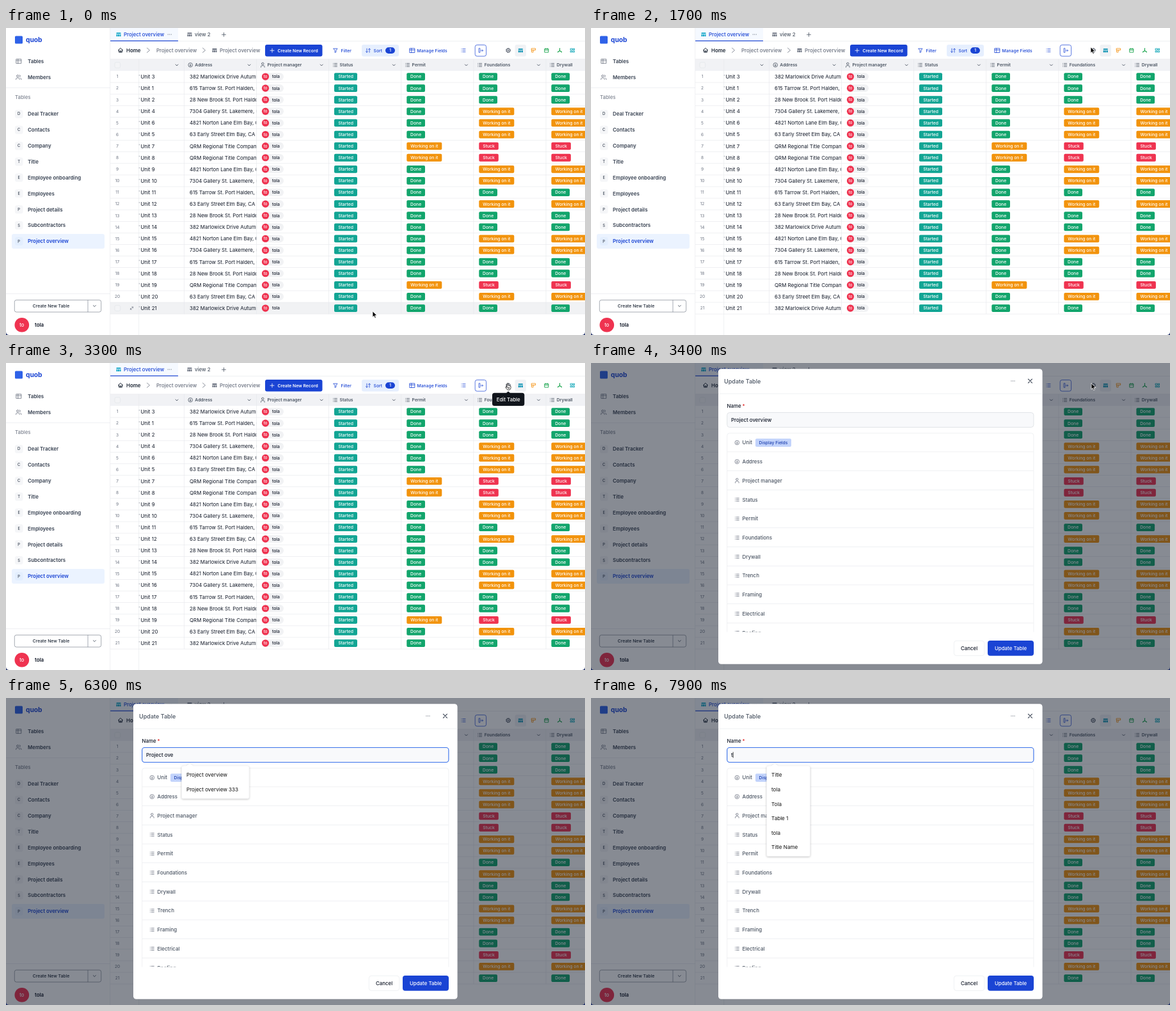
These frames come from a looping animation (905x480 px, 8000 ms). An HTML page:

```html
<!DOCTYPE html>
<html lang="en">
<head>
<meta charset="utf-8">
<title>Table editor</title>
<style>
html, body { margin: 0; width: 100%; height: 100%; overflow: hidden; background: #fff; }
svg { display: block; width: 905px; height: 480px; }
text { font-family: Inter, "Liberation Sans", sans-serif; white-space: pre; }
</style>
</head>
<body>
<svg id="stage" viewBox="0 0 905 480"></svg>
<script>
const LOOP = 8000, ROW = 18.1, TOP = 67;
const BLUE = '#1a44d4', INK = '#374151', LINE = '#e5e7eb', RED = '#ef3350';
const USER = 'tola', INITIALS = 'to', BRAND = 'quob';

// Text is centred vertically on y.
const text = (x, y, s, size = 7.92, fill = INK, weight = 500, anchor = 'start', attrs = '') =>
  `<text x="${x}" y="${y + size * .36}" font-size="${size}" fill="${fill}" font-weight="${weight}" text-anchor="${anchor}" ${attrs}>${s}</text>`;
const rect = (x, y, w, h, fill, r = 0, stroke = 'none', sw = .6, attrs = '') =>
  `<rect x="${x}" y="${y}" width="${w}" height="${h}" rx="${r}" fill="${fill}" stroke="${stroke}" stroke-width="${sw}" ${attrs}/>`;
const circle = (x, y, r, fill, stroke = 'none') =>
  `<circle cx="${x}" cy="${y}" r="${r}" fill="${fill}" stroke="${stroke}" stroke-width=".8"/>`;
const path = (x, y, d, stroke = INK, sw = .8, fill = 'none') =>
  `<path transform="translate(${x} ${y})" d="${d}" stroke="${stroke}" stroke-width="${sw}" fill="${fill}" stroke-linecap="round" stroke-linejoin="round"/>`;
const hline = (x, y, w, c = LINE) => rect(x, y - .3, w, .6, c);
const vline = (x, y, h, c = LINE) => rect(x - .3, y, .6, h, c);
const group = (id, body) => `<g id="${id}">${body}</g>`;

const ICON = {
  down: 'M-2 -1L0 1L2 -1',
  right: 'M-2 -3.5L2 0L-2 3.5',
  plus: 'M-3 0H3M0 -3V3',
  dots: 'M-2.5 0h.01M0 0h.01M2.5 0h.01',
  cross: 'M-3 -3L3 3M3 -3L-3 3',
  list: 'M-1.2 -2.4H3M-1.2 0H3M-1.2 2.4H3M-3 -2.4h.01M-3 0h.01M-3 2.4h.01',
  person: 'M-1.7 -2a1.7 1.7 0 1 0 3.4 0a1.7 1.7 0 1 0 -3.4 0M-2.8 3.6V2.6Q-2.8 1 -1 1H1Q2.8 1 2.8 2.6V3.6',
  table: 'M-3.8 -3.3H3.8V3.3H-3.8ZM-3.8 -1H3.8M-1.2 -3.3V3.3',
  people: 'M-3.3 -2a1.6 1.6 0 1 0 3.2 0a1.6 1.6 0 1 0 -3.2 0M-4.3 3.6V2.6Q-4.3 1 -2.6 1H-.6Q1 1 1 2.6V3.6M1.3 -3.5A1.6 1.6 0 0 1 1.3 -.5M2.6 1.2Q4 1.5 4 3.6',
  home: 'M-3.5 0L0 -3.5L3.5 0M-2.5 -.5V3H2.5V-.5M-.8 3V1H.8V3',
  funnel: 'M-3 -3H3L.9 0V2.5L-.9 3.2V0Z',
  sort: 'M-2 -3V3M-3.5 1.5L-2 3L-.5 1.5M2 3V-3M.5 -1.5L2 -3L3.5 -1.5',
  expand: 'M-2 2L2 -2M.2 -2H2V-.2M-2 .2V2H-.2'
};
const icon = (name, x, y, c = INK, sw = .8) => path(x, y, ICON[name], c, sw);
const fieldIcon = (kind, x, y, c = '#4b5563') => kind === 'text'
  ? circle(x, y, 3.3, 'none', c) + path(x, y, 'M0 -1.5V1.6M-1.1 .3L0 1.6L1.1 .3', c, .8)
  : icon(kind, x, y, c);
const solidGrid = (x, y, c) => rect(x - 3.5, y - 3, 7, 1.9, c, .5) +
  rect(x - 3.5, y - .5, 2, 3.5, c, .4) + rect(x - .9, y - .5, 2, 3.5, c, .4) + rect(x + 1.7, y - .5, 1.8, 3.5, c, .4);

function sidebar() {
  let s = rect(0, 0, 163, 480, '#fff') + vline(162.8, 0, 480);
  s += rect(14, 12.5, 12, 12, '#2f62e8', 1.5) + text(31, 18.3, BRAND, 10.2, BLUE, 700);
  s += icon('table', 20, 52, '#6b7280') + text(34, 52, 'Tables', 7.92, INK, 600);
  s += icon('people', 20, 77, '#6b7280') + text(34, 77, 'Members', 7.92, INK, 600);
  s += hline(0, 93.5, 163) + text(14, 108, 'Tables', 7.92, '#6b7280', 400);
  ['Deal Tracker', 'Contacts', 'Company', 'Title', 'Employee onboarding', 'Employees',
    'Project details', 'Subcontractors', 'Project overview'].forEach((name, i) => {
    const y = 134.4 + i * 24.88, on = i === 8;
    if (on) s += rect(9, y - 11.5, 145, 23, '#ebf3ff', 3);
    s += rect(14, y - 6.5, 12.5, 13, on ? '#e3eefe' : '#f5f6f8', 3);
    s += text(20.2, y, name[0], 5.8, INK, 500, 'middle') + text(34, y, name, 7.92, on ? BLUE : INK, 600);
  });
  s += hline(0, 415.5, 163) + rect(13.3, 425.3, 135.4, 18.8, '#fff', 3, '#6b7280') + vline(128, 425.3, 18.8, '#6b7280');
  s += text(70.5, 434.7, 'Create New Table', 6.79, '#1f2937', 500, 'middle') + icon('down', 138.3, 434.7);
  return s + circle(24.8, 464.3, 11.3, RED) + text(24.8, 464, INITIALS, 7.4, '#fff', 500, 'middle') +
    text(45, 464.3, USER, 7.92, '#111827', 600);
}

function toolbar() {
  let s = rect(163, 0, 106, 20, '#f5f9ff') + hline(163, 20.5, 742) + rect(163, 19.5, 106, 1.2, BLUE);
  s += solidGrid(176, 10.2, '#0ea5c6') + text(184, 10.2, 'Project overview', 7.92, BLUE) + icon('dots', 255.7, 10, INK, 1.1);
  s += solidGrid(287, 10.2, '#6b7280') + text(295, 10.2, 'view 2', 7.92, '#4b5563') + icon('plus', 340.5, 10.3, '#4b5563');
  s += icon('home', 179, 34.8, '#1f2937', 1) + text(188, 34.8, 'Home', 7.92, '#1f2937', 600);
  s += icon('right', 222.5, 34.8, '#6b7280') + text(235, 34.8, 'Project overview', 7.92, '#6b7280');
  s += icon('right', 309.5, 34.8, '#6b7280') + solidGrid(326, 35, '#6b7280') + text(334, 34.8, 'Project overview', 7.92, '#6b7280');
  s += rect(405, 26, 89.5, 18.5, BLUE, 3) + icon('plus', 416, 35.2, '#fff') + text(424.5, 35.2, 'Create New Record', 6.79, '#fff', 600);
  s += icon('funnel', 515, 35.2, BLUE) + text(523.5, 35.2, 'Filter', 6.79, BLUE);
  s += rect(556, 26, 58, 18.5, '#e6effe', 3) + icon('sort', 566, 35.2, BLUE) + text(574.5, 35.2, 'Sort', 6.79, BLUE);
  s += rect(593, 30.2, 15, 9.8, BLUE, 4.9) + text(600.5, 35.1, '1', 6.4, '#fff', 600, 'middle');
  s += icon('table', 635, 35.2, BLUE) + text(642.5, 35.2, 'Manage Fields', 6.79, BLUE);
  s += icon('list', 715, 35, BLUE, .7) + rect(733.2, 26.5, 17.4, 17.6, '#fff', 3, BLUE, .7);
  s += path(742, 35.2, 'M-3 -3V3H-1V-3ZM.3 0H3.5M2.2 -1.3L3.5 0L2.2 1.3', BLUE, .7);
  s += circle(785, 35, 2.8, 'none', '#374151') + circle(785, 35, 1, 'none', '#374151');
  s += `<circle cx="785" cy="35" r="3.4" fill="none" stroke="#374151" stroke-width="1" stroke-dasharray="1.33 1.33"/>`;
  s += rect(795.5, 26, 17.5, 18.5, '#f0f2f5', 3) + solidGrid(804.3, 35.2, '#0891b2');
  s += path(824.6, 35, 'M-3 -3H3V-.5H-3ZM-3 -.5V2.8H-.5V-.5', '#f59316', .9);
  s += path(845, 35, 'M-2.8 -2.4H2.8V3H-2.8ZM-2.8 -.6H2.8M-1.3 -3.3V-2.4M1.3 -3.3V-2.4', '#16a34a', .9);
  s += path(865.5, 35, 'M0 -3V.5L-2.8 2.5M0 .5L2.8 2.5M-.3 -3H.3M-3 2.3V2.8M3 2.3V2.8', '#16a34a', 1.1);
  return s + path(885.5, 35, 'M-3 -2.8H0V-.6H-3ZM1.7 -2.8H3V-.6H1.7ZM-3 1H-1.3V2.8H-3ZM.2 1H3V2.8H.2Z', '#0ea5b7', .9);
}

const COLS = [278.5, 391.6, 504.7, 617.8, 730.9, 844];
const HEADS = ['Address', 'Project manager', 'Status', 'Permit', 'Foundations', 'Drywall'];
const KINDS = ['text', 'person', 'list', 'list', 'list', 'list'];
const ADDRESSES = ['382 Marlowick Drive Autumn Valley', '615 Tarrow St. Port Halden, CA', '28 New Brook St. Port Halden, CA',
  '7304 Gallery St. Lakemere, CA', '4821 Norton Lane Elm Bay, CA', '63 Early Street Elm Bay, CA', 'QRM Regional Title Company'];
const ADDRESS_OF = '012345664315204312650';
const UNITS = [3, 1, 2, 4, 6, 5, ...Array.from({ length: 15 }, (_, i) => i + 7)];
const PERMITS = 'DDDDDDWWDDDDDDDDDDWDD';
const STATES = 'DDDWWWSSWWDWDDWWDDSWD';
const TAGS = {
  T: ['Started', 36, '#12a594'], D: ['Done', 28.7, '#12a56c'],
  W: ['Working on it', 55, '#f2930c'], S: ['Stuck', 30.5, RED]
};
const tag = (x, y, k) => rect(x, y - 5.9, TAGS[k][1], 11.8, TAGS[k][2], 2) + text(x + TAGS[k][1] / 2, y, TAGS[k][0], 6.79, '#fff', 500, 'middle');
const rowY = i => TOP + ROW * (i + .5);

function table() {
  let s = rect(163, 48.8, 742, 18.2, '#f1f2f5') + hline(163, 48.8, 742) + rect(170, 53.7, 8.6, 8.6, '#f3f4f6', 2, '#dfe2e6');
  s += icon('down', 267, 58);
  HEADS.forEach((h, i) => {
    s += fieldIcon(KINDS[i], COLS[i] + 9.7, 57.8) + text(COLS[i] + 16.8, 57.8, h, 6.79, '#4b5563', 600);
    if (i < 5) s += icon('down', COLS[i] + 101.6, 58);
  });
  s += rect(163, 0, 742, ROW, '#f1f2f4', 0, 'none', 0, 'id="hover"');
  UNITS.forEach((unit, i) => {
    const y = rowY(i);
    s += hline(163, y + ROW / 2, 742) + group('num' + i, text(174, y, i + 1, 6.5, '#6b7280', 400, 'middle'));
    s += rect(207.8, y - 3, .8, 1.6, '#6b7280') + text(210.4, y, 'Unit ' + unit, 7.92, '#111827', 400);
    s += `<g clip-path="url(#cell)">${text(287, y, ADDRESSES[ADDRESS_OF[i]], 7.92, '#111827', 400)}</g>`;
    s += rect(400, y - 5.8, 34, 11.6, '#f1f2f4', 5.8) + circle(405.5, y, 5.6, RED) + text(405.5, y - .2, INITIALS, 6, '#fff', 500, 'middle');
    s += text(416, y, USER, 6.79, '#111827', 500);
    s += tag(513, y, 'T') + tag(626.3, y, PERMITS[i]) + tag(739.3, y, STATES[i]) + tag(852.4, y, STATES[i]);
  });
  [207.8, ...COLS].forEach((x, i) => s += vline(x, 48.8, i ? 398.3 : 431.2));
  return s + group('tools', rect(170, -4.3, 8.6, 8.6, '#f3f4f6', 2, '#dfe2e6') + icon('expand', 196.5, 0, '#6b7280', .7));
}

function dialog() {
  let s = rect(199, 9.2, 506.6, 461.6, '#fff', 4.5) + text(208, 28.3, 'Update Table', 9.05, '#4b5563', 500);
  s += icon('dots', 659.5, 28, INK, 1.2) + icon('cross', 686.4, 28.2, '#374151', 1.1) + hline(199, 48, 506.6);
  s += text(212.5, 67, 'Name', 7.92, '#111827') + text(236.5, 67.3, '*', 7.92, '#e02424');
  s += rect(212.7, 77.5, 479.2, 23, '#f8f9fb', 4, '#d1d5db', .6, 'id="field"');
  s += text(219, 89, '', 7.92, '#111827', 500, 'start', 'id="value"') + rect(0, 84.5, .8, 9, '#111', 0, 'none', 0, 'id="caret"');
  let list = rect(212.7, 109.7, 479.2, 340, '#fff', 4, LINE);
  ['Unit', ...HEADS, 'Trench', 'Framing', 'Electrical', 'Roofing'].forEach((name, i) => {
    const y = 124.5 + i * 29.72;
    list += fieldIcon(i ? KINDS[i - 1] || 'list' : 'text', 228.3, y, '#6b7280') + text(236.6, y, name, 7.92, '#4b5563') + hline(213, y + 14.4, 478.6);
  });
  list += rect(257, 118.2, 56, 12.8, '#c2d3fb', 2) + text(285, 124.5, 'Display Fields', 6.79, '#1e40af', 500, 'middle');
  s += `<g clip-path="url(#list)">${list}</g>`;
  s += rect(567.3, 434.3, 47.5, 23.3, '#fff', 4, LINE) + text(591, 446, 'Cancel', 7.92, '#111827', 500, 'middle');
  return s + rect(620, 434, 72, 23.8, BLUE, 4) + text(656, 446, 'Update Table', 7.92, '#fff', 500, 'middle');
}

function menu(id, w, items) {
  const right = 274.5 + w, bottom = 112 + 22.6 * items.length;
  const box = path(0, 0, `M277 106H282L287.3 101.5L292.5 106H${right - 2.5}Q${right} 106 ${right} 108.5V${bottom - 2.5}Q${right} ${bottom} ${right - 2.5} ${bottom}H277Q274.5 ${bottom} 274.5 ${bottom - 2.5}V108.5Q274.5 106 277 106Z`, '#dcdee1', .3, '#fff');
  return group(id, `<g filter="url(#shadow)">${box}</g>` + items.map((s, i) => text(282, 120.5 + 22.6 * i, s, 8.1, '#111', 400)).join(''));
}

// Each pointer is drawn around its hot spot.
const pointers =
  group('arrow', path(0, 0, 'M0 0V9.2L2.2 7.2L3.7 10.6L5.3 9.9L3.8 6.6H6.7Z', '#fff', .8, '#000')) +
  group('hand', path(2.5, 4, 'M-1.5 2V-3.6Q-.6 -5 .3 -3.6V-.8Q1.3 -1.6 1.8 -.5Q2.9 -1.1 3.3 0Q4.4 -.3 4.5 1V3Q4.2 5.6 2.5 6H-.6Q-2 5 -3.8 1.7Q-3.4 .3 -1.5 2ZM.4 2V4M1.9 2V4', '#111', .8, '#fff')) +
  group('beam', path(0, 0, 'M-1.8 -5Q-.3 -5 0 -4.2Q.3 -5 1.8 -5M0 -4.2V4.2M-1.8 5Q-.3 5 0 4.2Q.3 5 1.8 5M-1 .8H1', '#111', .9));

document.getElementById('stage').innerHTML =
  `<defs><clipPath id="cell"><rect x="279" y="67" width="112.3" height="400"/></clipPath>
  <clipPath id="list"><rect x="212" y="109" width="481" height="311.5"/></clipPath>
  <filter id="shadow" x="-20%" y="-20%" width="140%" height="150%"><feDropShadow dx="0" dy="1" stdDeviation="1.5" flood-opacity=".25"/></filter></defs>` +
  rect(0, 0, 905, 480, '#fff') + toolbar() + table() + sidebar() +
  group('tip', rect(760, 46.8, 50.3, 20.2, '#11151c', 3.5) + path(785, 46.8, 'M-3 .2L0 -2.6L3 .2Z', 'none', 0, '#11151c') + text(785.2, 56.8, 'Edit Table', 7.92, '#fff', 500, 'middle')) +
  group('modal', rect(0, 0, 905, 480, '#111928', 0, 'none', 0, 'opacity=".5"') + dialog()) +
  menu('menuA', 105.5, ['Project overview', 'Project overview 333']) +
  menu('menuB', 68, ['Title', USER, 'Tola', 'Table 1', USER, 'Title Name']) +
  group('pointer', pointers) +
  path(0, 480, 'M0 0V-4.5Q.4 -.4 4.5 0Z', 'none', 0, '#1c2c66') + path(905, 480, 'M0 0V-4.5Q-.4 -.4 -4.5 0Z', 'none', 0, '#1c2c66');

const el = id => document.getElementById(id);
const show = (id, on) => el(id).setAttribute('visibility', on ? 'visible' : 'hidden');
const ease = v => v * v * (3 - 2 * v);

const HOVER = 1800, TIP = 2000, OPEN = 3350, FOCUS = 4650, MENU = 4850, ERASE = 5850, TYPE = 7700;
// time, x, y of the pointer
const MOVES = [[0, 573, 443], [500, 573, 443], [1650, 781, 30], [1750, 781, 30], [1850, 782, 32],
  [3700, 782, 32], [4450, 425, 90], [LOOP, 425, 90]];

function pointerAt(t) {
  const i = MOVES.findIndex((m, k) => k && t < m[0]);
  const [a, b] = [MOVES[i - 1], MOVES[i]], p = ease((t - a[0]) / (b[0] - a[0]));
  return [a[1] + (b[1] - a[1]) * p, a[2] + (b[2] - a[2]) * p];
}

function drawPointer(t, open) {
  const [x, y] = pointerAt(t);
  const kind = open ? (x < 692 && y > 77 ? 'beam' : 'arrow') : t >= HOVER ? 'hand' : 'arrow';
  ['arrow', 'hand', 'beam'].forEach(k => show(k, k === kind && t < ERASE));
  el('pointer').setAttribute('transform', `translate(${x} ${y})`);

  const row = open ? -1 : Math.floor((y - TOP) / ROW), over = row >= 0 && row < UNITS.length;
  UNITS.forEach((_, i) => show('num' + i, i !== row));
  show('hover', over);
  show('tools', over);
  if (over) {
    el('hover').setAttribute('y', TOP + row * ROW);
    el('tools').setAttribute('transform', `translate(0 ${rowY(row)})`);
  }
}

function drawField(t) {
  const focused = t >= FOCUS;
  el('field').setAttribute('stroke', focused ? '#3a72ea' : '#d1d5db');
  el('field').setAttribute('stroke-width', focused ? 1.13 : .6);
  const gone = t < ERASE ? 0 : 1 + Math.floor((t - ERASE) / 95);
  const value = t >= TYPE ? 't' : 'Project overview'.slice(0, Math.max(0, 16 - gone));
  el('value').textContent = value;
  show('caret', focused && (t - FOCUS) % 1060 < 530);
  el('caret').setAttribute('x', 219 + (value ? el('value').getComputedTextLength() : 0));
  show('menuA', t >= MENU && t < TYPE && value);
  show('menuB', t >= TYPE);
}

function draw(t) {
  const open = t >= OPEN;
  show('tip', t >= TIP && !open);
  el('modal').setAttribute('display', open ? 'inline' : 'none');
  drawPointer(t, open);
  drawField(t);
  if (!open) show('caret', false);
}

(function frame() {
  draw(performance.now() % LOOP);
  requestAnimationFrame(frame);
})();
</script>
</body>
</html>
```
